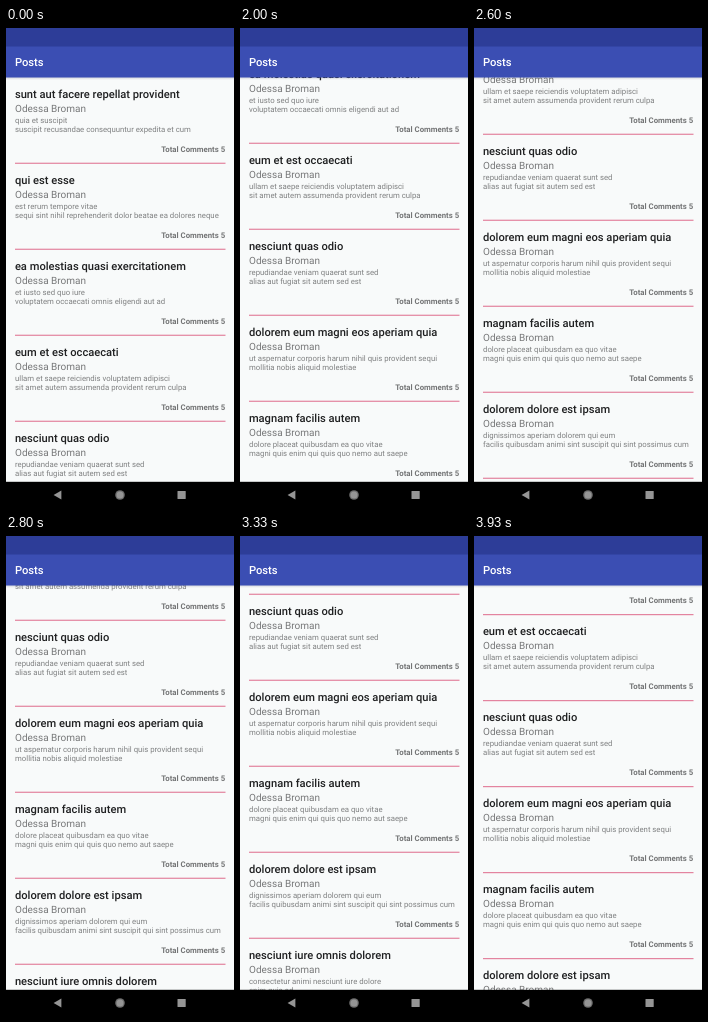
These frames come from a looping animation (228x480 px, 3.99 s). An HTML page:

```html
<!DOCTYPE html>
<html lang="en">
<head>
<meta charset="utf-8">
<title>Posts</title>
<style>
  html, body { margin: 0; width: 100%; height: 100%; overflow: hidden; background: #f8fafa; }
  svg { display: block; width: 228px; height: 480px; }
  text { font-family: Roboto, sans-serif; text-rendering: geometricPrecision; white-space: pre; }
  .title { font-size: 11.15px; font-weight: 500; fill: #202122; }
  .name { font-size: 10px; fill: #777879; }
  .body { font-size: 7.77px; fill: #7f8081; }
  .count { font-size: 7.8px; font-weight: 700; fill: #747576; text-anchor: end; }
  .rule { fill: #e27896; }
  .bar { font-size: 11.2px; font-weight: 500; fill: #fff; }
</style>
</head>
<body>
<svg viewBox="0 0 228 480">
  <defs>
    <linearGradient id="shade" x2="0" y2="1">
      <stop offset="0" stop-color="#1c2340" stop-opacity=".18"/>
      <stop offset="1" stop-color="#1c2340" stop-opacity="0"/>
    </linearGradient>
  </defs>
  <rect width="228" height="480" fill="#f8fafa"/>
  <g id="list"></g>
  <rect y="49" width="228" height="3" fill="url(#shade)"/>
  <rect width="228" height="49.5" fill="#3b4eb3"/>
  <rect width="228" height="18.5" fill="#2d3d98"/>
  <text class="bar" x="8.9" y="38.4">Posts</text>
  <rect y="453.8" width="228" height="26.2" fill="#000"/>
  <g fill="#959595">
    <path d="M47.6 467 L55.4 462.6 V471.4 Z"/>
    <circle cx="114" cy="467" r="4.8" fill="#6c6c6c"/>
    <circle cx="114" cy="467" r="3.5"/>
    <rect x="171.5" y="462.9" width="8.2" height="8.2" rx=".6"/>
  </g>
</svg>
<script>
const SVG = "http://www.w3.org/2000/svg";
const LOOP = 3990, STEP = 1000 / 15, PITCH = 86;
const AUTHOR = "Odessa Broman";

const posts = [
  ["sunt aut facere repellat provident", "quia et suscipit", "suscipit recusandae consequuntur expedita et cum"],
  ["qui est esse", "est rerum tempore vitae", "sequi sint nihil reprehenderit dolor beatae ea dolores neque"],
  ["ea molestias quasi exercitationem", "et iusto sed quo iure", "voluptatem occaecati omnis eligendi aut ad"],
  ["eum et est occaecati", "ullam et saepe reiciendis voluptatem adipisci", "sit amet autem assumenda provident rerum culpa"],
  ["nesciunt quas odio", "repudiandae veniam quaerat sunt sed", "alias aut fugiat sit autem sed est"],
  ["dolorem eum magni eos aperiam quia", "ut aspernatur corporis harum nihil quis provident sequi", "mollitia nobis aliquid molestiae"],
  ["magnam facilis autem", "dolore placeat quibusdam ea quo vitae", "magni quis enim qui quis quo nemo aut saepe"],
  ["dolorem dolore est ipsam", "dignissimos aperiam dolorem qui eum", "facilis quibusdam animi sint suscipit qui sint possimus cum"],
  ["nesciunt iure omnis dolorem", "consectetur animi nesciunt iure dolore", "enim quia ad"]
];

// time in ms, scroll offset in px
const track = [
  [0, 0], [1667, 0], [1733, 14], [1800, 60], [1867, 116], [1933, 160], [2000, 192],
  [2133, 220], [2300, 247], [2600, 287], [2800, 309], [3000, 326.4], [3133, 332.5],
  [3267, 335], [3667, 335], [3733, 333], [3800, 312], [3867, 271], [3933, 228.8], [4000, 190]
];

const list = document.getElementById("list");

function add(parent, tag, attrs, content) {
  const el = document.createElementNS(SVG, tag);
  for (const key in attrs) el.setAttribute(key, attrs[key]);
  if (content) el.textContent = content;
  return parent.appendChild(el);
}

posts.forEach(([title, first, second], i) => {
  const row = add(list, "g", { transform: `translate(0 ${i * PITCH})` });
  const line = (cls, y, str, x = 9) => add(row, "text", { class: cls, x, y }, str);
  line("title", 70, title, 8.9);
  line("name", 83.8, AUTHOR);
  line("body", 95.1, first);
  line("body", 104.1, second);
  line("count", 123.6, "Total Comments 5", 219.2);
  add(row, "rect", { class: "rule", x: 9, y: 134.7, width: 210.5, height: 1.1 });
});

function offsetAt(t) {
  let i = 1;
  while (i < track.length - 1 && track[i][0] < t) i++;
  const [t0, y0] = track[i - 1], [t1, y1] = track[i];
  const k = Math.min(1, Math.max(0, (t - t0) / (t1 - t0)));
  return y0 + (y1 - y0) * k;
}

function draw(ms) {
  // the list moves at 15 steps per second
  const t = Math.floor((ms % LOOP + 4) / STEP) * STEP;
  list.setAttribute("transform", `translate(0 ${-offsetAt(t).toFixed(1)})`);
}

const start = performance.now();
function tick() {
  draw(performance.now() - start);
  requestAnimationFrame(tick);
}
tick();
</script>
</body>
</html>
```
